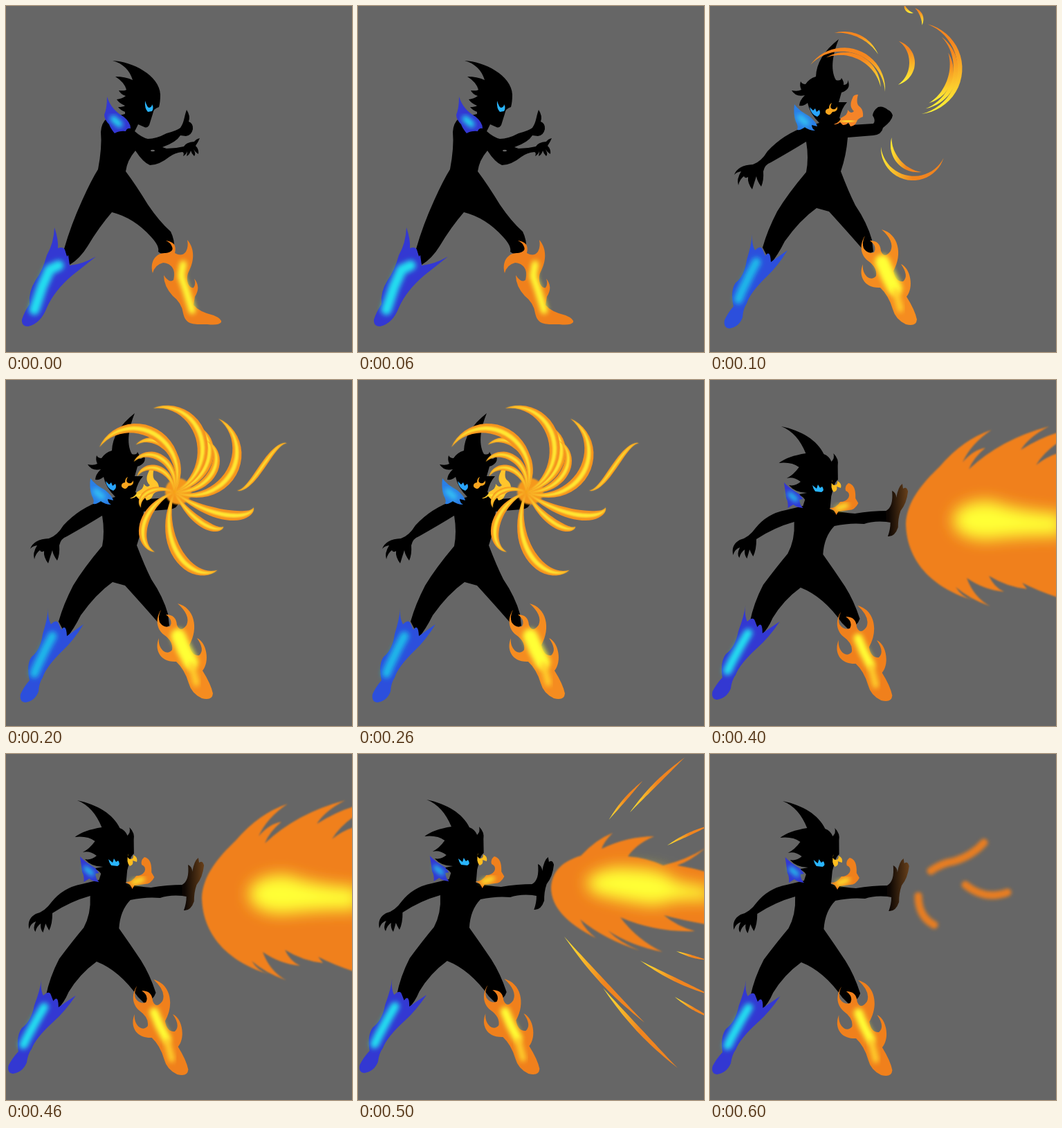
Recreate the animation shown at these times as an HTML page. Size 500 px wide and 500 px high, loop 700 ms.

```html
<!DOCTYPE html>
<html lang="en">
<head>
<meta charset="utf-8">
<title>Fire blast</title>
<style>
html, body { margin: 0; width: 100%; height: 100%; overflow: hidden; background: #666; }
svg { display: block; width: 100vw; height: 100vh; }
.step { visibility: hidden; animation: show 700ms step-end infinite; animation-delay: calc(var(--n) * 100ms - 700ms); }
@keyframes show { 0% { visibility: visible; } 14.2857%, 100% { visibility: hidden; } }
.pale { --cold: #2c4fdc; --ice: #1cb9ea; --warm: #f58c20; --wide: 21; }
.blue { fill: var(--cold, #3338d2); }
.fire { fill: var(--warm, #f0801c); }
.hand { fill: var(--hand, #000); }
.glow { fill: none; stroke-linecap: round; stroke-linejoin: round; filter: url(#soft); }
.cyan { stroke: var(--ice, #20dff0); }
.yellow { stroke: #ffff35; }
.leg { stroke-width: var(--wide, 13); }
.core { fill: #ffff35; filter: url(#wide); }
.ring { fill: none; stroke: #e3821f; stroke-width: 3; stroke-linecap: round; }
.puff { fill: none; stroke: #e57d20; stroke-width: 11; stroke-linecap: round; filter: url(#haze); }
.lit { fill: #ffe632; filter: url(#edge); }
</style>
</head>
<body>
<svg viewBox="0 0 500 500" preserveAspectRatio="none">
<defs>
  <filter id="soft" x="-100%" y="-100%" width="300%" height="300%"><feGaussianBlur stdDeviation="3.5"/></filter>
  <filter id="haze" x="-50%" y="-50%" width="200%" height="200%"><feGaussianBlur stdDeviation="2.6"/></filter>
  <filter id="wide" x="-50%" y="-50%" width="200%" height="200%"><feGaussianBlur stdDeviation="11"/></filter>
  <filter id="edge" x="-10%" y="-10%" width="120%" height="120%"><feGaussianBlur stdDeviation="1"/></filter>
  <linearGradient id="down" x2="0" y2="1"><stop offset=".2" stop-color="#f5861f"/><stop offset=".95" stop-color="#fff035"/></linearGradient>
  <linearGradient id="across"><stop offset="0" stop-color="#ffe833"/><stop offset=".5" stop-color="#f0841f"/></linearGradient>
  <linearGradient id="singed"><stop offset=".1" stop-color="#120a04"/><stop offset="1" stop-color="#a8611c"/></linearGradient>
  <linearGradient id="charred"><stop offset=".1" stop-color="#0c0603"/><stop offset="1" stop-color="#68401a"/></linearGradient>

  <g id="coldBoot">
    <path class="blue" d="M61 330Q60 344 65 353Q73 345 76 352L80 361Q87 351 88 370Q99 362 112 353Q98 376 82 391Q58 414 53 430Q48 437 47 450Q42 464 28 466Q19 465 21 454Q26 443 34 434Q29 411 37 400Q50 390 53 367Q60 345 61 330Z"/>
    <path class="glow cyan" stroke-width="13" d="M67 370L57 389L45 414L41 424"/>
  </g>
  <g id="hotBoot">
    <path class="fire" d="M224 332C215 346 218 360 228 368Q242 378 240 390C232 400 219 388 221 373C214 389 222 408 246 407Q258 418 264 438Q268 453 283 460Q298 464 299 453Q296 439 284 420C295 407 290 379 276 373Q288 390 279 398Q268 399 265 383C279 358 272 329 248 323Q267 340 261 354Q252 366 247 354Q246 339 231 339Q242 347 237 356Q228 359 222 350Q219 342 224 332Z"/>
    <path class="glow yellow leg" d="M249 370L257 389L267 408"/>
    <path class="glow" stroke="#ffd02c" stroke-width="9" d="M268 412L275 438"/>
  </g>

  <g id="guard">
    <path d="M154 79C182 80 222 100 223 128Q223 139 221 146Q213 148 212 156L207 172Q204 177 200 175L191 171L186 181Q196 190 205 192Q217 192 232 184Q247 180 252 176C258 167 257 161 261 150Q267 159 264 167Q271 170 270 178Q268 187 260 188L252 187Q246 197 226 204L232 206Q245 206 257 203Q260 197 272 196Q275 192 280 191Q278 196 274 202Q279 207 278 214Q274 212 271 207Q275 214 272 217Q268 213 267 209Q266 214 261 217Q262 213 262 210Q260 215 256 217Q258 212 255 211Q244 212 236 218Q221 230 208 230Q198 226 187 209Q175 223 173 239Q188 259 205 287Q222 312 238 326Q244 338 243 352Q229 363 220 355Q222 347 210 334Q185 306 153 298Q134 320 118 347Q107 365 92 374L84 351Q94 316 110 281Q123 252 133 236Q139 204 137 182Q138 169 145 163L172 156L172 153Q166 151 162 146Q169 146 172 144Q164 141 160 135Q168 134 173 130Q165 127 163 122Q172 123 174 121Q171 110 158 102Q172 102 183 107C179 93 169 83 154 79Z"/>
    <ellipse cx="212" cy="209" rx="3" ry="1.2" fill="#666"/>
    <path class="blue" d="M146 131Q152 150 170 160Q180 168 180 177Q175 176 173 181Q164 180 157 184Q151 177 149 171Q142 164 142 157Q146 148 146 131Z"/>
    <path class="glow cyan" stroke-width="9" d="M155 163L164 171"/>
    <path fill="#29b5ff" d="M201 137Q204 147 207 147Q211 146 211 142Q214 147 211 152L205 153Q200 148 201 137Z"/>
    <path class="blue" d="M70 320Q76 338 75 350Q82 347 85 352L88 362L90 360L92 375Q111 373 130 362Q114 375 96 389Q70 411 59 436Q50 459 32 463Q22 463 23 453Q27 441 34 431Q32 413 43 396Q53 382 59 360Q69 343 70 320Z"/>
    <path class="glow cyan" stroke-width="15" d="M76 375L63 381L52 406L41 439"/>
    <path class="fire" d="M231 339Q248 341 244 357Q254 363 260 355Q264 348 262 338C275 353 270 372 265 382C258 394 264 409 271 407Q275 402 272 394Q282 406 273 420L271 432Q279 442 300 447Q312 452 311 457Q307 462 291 460C272 460 260 462 256 444Q254 429 241 419Q228 405 228 389Q236 401 242 396C246 382 240 372 227 371Q215 374 212 386C207 368 218 356 231 357Q243 355 240 348Q238 342 231 339Z"/>
    <path class="glow yellow" stroke-width="10" d="M256 373L253 390L260 410L269 440"/>
  </g>

  <g id="windup" class="pale">
    <path d="M186 48C178 68 173 91 182 107Q189 109 190 104Q194 110 193 114Q200 114 199 107Q205 120 190 125L186 139L198 139Q190 148 187 162L204 172L236 170Q240 166 235 158Q236 151 243 146Q250 144 257 150Q262 152 264 158Q263 166 250 176Q248 186 236 187L199 190Q197 216 189 239Q200 268 210 288Q227 313 234 338L236 355Q225 362 221 352Q202 330 172 297L154 292Q130 309 108 340Q98 360 88 372L76 349Q83 324 97 297Q112 272 139 240Q143 220 139 196Q118 209 88 226Q79 229 77 239Q78 252 74 261Q68 253 67 246Q64 255 61 265Q54 256 55 247Q51 250 49 246Q43 250 41 259Q38 250 45 239Q38 240 35 244Q40 230 62 229Q74 225 83 210Q106 185 139 174L158 169Q144 155 141 140Q136 145 129 144Q129 137 137 129Q124 132 118 122Q127 124 132 121Q129 115 131 109Q133 113 138 113Q143 105 153 102Q154 73 186 48Z"/>
    <path fill="#2a7fe6" d="M122 142Q128 151 143 159Q154 168 155 174L147 172Q147 177 152 180Q143 180 137 175Q131 180 126 179Q128 174 124 167Q120 155 122 142Z"/>
    <path class="glow" stroke="#36c4f4" stroke-width="9" d="M130 161L139 169"/>
    <path style="fill:var(--collar,#f58428)" d="M179 171Q188 168 189 162Q200 157 199 150Q204 157 208 152Q200 145 206 133Q207 128 214 128Q210 142 217 146Q222 151 221 160Q213 163 212 167Q210 173 203 174L200 168Q198 172 192 172L188 168Q184 172 179 171Z"/>
    <path class="glow yellow" stroke-width="6" d="M193 167L205 166"/>
    <path fill="#29a5ff" d="M144 146L149 151L152 148L154 153L158 150Q161 156 155 160Q146 157 144 146Z"/>
    <path fill="#f9a51e" d="M176 140Q172 147 177 149Q182 150 184 145Q185 153 177 153Q172 161 167 154Q166 149 172 148Q172 142 176 140Z"/>
    <use href="#coldBoot"/>
    <use href="#hotBoot"/>
  </g>

  <g id="strike">
    <path d="M132 68C161 74 184 88 193 108Q201 111 204 119Q209 114 207 107Q215 115 213 125L213 145Q209 148 207 155L203 169L201 188Q219 193 237 194Q260 190 284 190L284 206Q263 204 250 209Q230 207 207 212Q192 227 190 253Q206 276 221 299Q234 320 242 346Q238 358 225 361L216 352Q190 314 157 301Q132 319 116 345Q109 361 100 369L83 351Q89 323 103 297Q122 272 139 252Q150 232 149 206Q120 214 94 231Q94 246 89 256Q86 251 84 246Q82 253 80 259Q76 254 77 246Q71 250 69 258Q65 253 70 243Q63 245 60 254Q57 239 70 232Q83 229 93 215Q110 194 137 189L162 183L165 174Q161 167 152 167L168 164Q151 164 142 153Q151 155 159 148Q149 140 139 143Q149 138 157 127Q146 119 128 121Q141 111 167 107C159 87 149 75 132 68Z"/>
    <path class="hand" d="M282 190Q293 184 291 161Q297 164 297 171Q300 155 306 151L307 158Q312 154 314 162Q312 179 303 190Q299 201 299 214Q294 228 284 227Q288 216 288 207L282 206Z"/>
    <path class="blue" d="M135 149Q142 157 157 166L162 173L157 174Q157 181 162 186Q152 185 148 181L140 186Q141 177 138 172Z"/>
    <path class="glow cyan" stroke-width="6" d="M143 166L152 174"/>
    <path class="fire" d="M200 186Q209 187 216 177Q224 177 228 171Q231 164 224 161Q222 155 228 150Q239 152 238 172L242 179Q237 189 228 189L213 191L210 196Q207 188 200 186Z"/>
    <path class="glow yellow" stroke-width="6" d="M211 187L225 182"/>
    <path fill="#29b5ff" d="M176 153L182 158L184 152L187 157L190 155Q194 160 189 163L180 162Q177 158 176 153Z"/>
    <path fill="#ffbd20" d="M205 145Q202 150 207 153Q213 153 212 147Q219 150 217 157L211 155Q213 160 207 163Q201 158 205 145Z"/>
    <use href="#coldBoot" transform="matrix(1 0 -.074 1 40.4 -3)"/>
    <use href="#hotBoot" transform="matrix(1 0 -.02 1 -2.5 4)"/>
  </g>
</defs>

<rect width="500" height="500" fill="#666"/>

<g class="step" style="--n:0"><use href="#guard"/></g>

<g class="step" style="--n:1">
  <use href="#windup"/>
  <g id="wisps" fill="url(#down)"></g>
  <g id="lowWisps" fill="url(#across)"></g>
</g>

<g class="step" style="--n:2;--collar:#ffc52c">
  <use href="#windup"/>
  <ellipse cx="249" cy="161" rx="19" ry="19" fill="#f5981f" filter="url(#edge)"/>
  <g id="swirl" fill="#f5941f"></g>
</g>

<g class="step" style="--n:3;--hand:url(#singed)">
  <use href="#strike"/>
  <path class="ring" d="M314 145C312 80 318 45 324 44C332 45 328 100 327 130M305 135C303 95 310 68 318 70C328 75 326 110 326 130M289 230C290 270 298 286 304 286C313 284 314 270 316 262M301 218C300 260 310 276 318 272"/>
  <path class="fire" filter="url(#edge)" d="M327 118C338 87 367 70 396 70C430 73 436 114 447 145C457 180 480 198 502 199V205C472 207 456 225 441 246C422 286 395 307 360 307C332 304 318 288 316 262C323 227 323 172 327 118Z"/>
  <path class="core" d="M378 128Q415 112 424 142Q437 190 423 218Q402 270 373 268Q355 252 367 210Q355 160 378 128Z"/>
</g>

<g class="step" style="--n:4;--hand:url(#charred)">
  <use href="#strike" transform="matrix(1 0 .013 1 -30 -1)"/>
  <path class="fire" filter="url(#edge)" d="M283 207C285 175 306 150 332 125Q365 86 407 72Q377 92 365 119Q380 101 398 98Q381 112 374 129Q421 85 490 67Q461 82 449 101Q476 84 502 76V91Q482 105 471 123Q486 111 502 106V314Q472 304 451 293L458 302Q429 299 403 283Q411 300 425 306Q395 303 371 286Q381 314 405 327Q374 316 355 299Q364 314 380 318C328 303 284 267 283 207Z"/>
  <path class="core" d="M352 194Q368 173 407 175Q445 190 510 193V225Q445 225 400 231Q362 230 352 210Z"/>
</g>

<g class="step" style="--n:5">
  <use href="#strike" transform="matrix(1 0 .02 1 -34.2 -2)"/>
  <g id="sparks" fill="url(#across)"></g>
  <path class="fire" filter="url(#edge)" d="M279 193C281 165 300 154 322 147Q343 124 368 114Q355 127 352 137Q389 119 428 119Q402 130 390 148Q418 150 441 161Q474 153 502 136Q480 155 461 161Q480 164 502 170V246Q468 240 442 233Q461 249 487 256Q430 258 379 236Q404 269 440 286Q394 277 361 255Q379 273 407 284Q356 268 321 239Q329 255 344 266Q279 234 279 193Z"/>
  <path class="core" d="M330 182Q355 160 394 165Q442 165 460 185L510 194V212Q460 207 430 219Q390 215 345 203Q332 198 330 182Z"/>
</g>

<g class="step" style="--n:6;--hand:url(#charred)">
  <use href="#strike" transform="matrix(1 0 .0077 1 -27.5 0)"/>
  <path class="puff" d="M319 169Q334 158 353 155Q379 147 396 128M369 189Q397 212 430 200M301 205Q301 235 324 247"/>
</g>
</svg>
<script>
const polar = (x, y, r, deg) => [x + r * Math.cos(deg * Math.PI / 180), y + r * Math.sin(deg * Math.PI / 180)];

// Outline of a stroke along curve(t) that swells to half width w and ends in points.
function taper(curve, w, steps = 24) {
  const left = [], right = [];
  for (let i = 0; i <= steps; i++) {
    const t = i / steps, [x, y] = curve(t);
    const [ax, ay] = curve(t - .01), [bx, by] = curve(t + .01);
    const k = w * Math.sin(Math.PI * t) / Math.hypot(bx - ax, by - ay);
    left.push([x - (by - ay) * k, y + (bx - ax) * k]);
    right.unshift([x + (by - ay) * k, y - (bx - ax) * k]);
  }
  return 'M' + [...left, ...right].map(p => p.map(v => v.toFixed(1))).join('L') + 'Z';
}

function draw(id, curve, w, name = '') {
  const group = document.getElementById(id);
  const path = document.createElementNS(group.namespaceURI, 'path');
  path.setAttribute('d', taper(curve, w));
  path.setAttribute('class', name);
  group.append(path);
}

// Concentric arcs, each one smaller and shorter than the last.
function arcs(id, x, y, r, from, to, w, count = 1) {
  for (let i = 0; i < count; i++) {
    const a = from + 24 * i, b = to - 7 * i;
    draw(id, t => polar(x, y, r - 6 * i, a + (b - a) * t), w);
  }
}
arcs('wisps', 192, 124, 61, -140, 0, 3, 2);
arcs('wisps', 190, 98, 60, -100, -28, 2);
arcs('wisps', 257, 82, 35, -63, 65, 4);
arcs('wisps', 294, 90, 67, -72, 80, 3.5, 3);
arcs('wisps', 285, 22, 22, -60, 15, 2);
arcs('wisps', 294, -3, 13, 180, 90, 1.8);
arcs('lowWisps', 294, 202, 47, 178, 22, 3.2);
arcs('lowWisps', 306, 196, 44, 188, 90, 3);

function lit(curve, w) {
  draw('swirl', curve, w);
  draw('swirl', curve, w * .4, 'lit');
}

// Spiral arms around the fist; tip angle and length change evenly within a fan.
function fan(from, step, count, len, grow, curl) {
  for (let i = 0; i < count; i++) {
    const reach = len + grow * i, tip = from + step * i;
    lit(t => polar(243, 162, reach * Math.sin(t * Math.PI / 2), tip + curl * (1 - t)), 1.5 + reach * .05);
  }
}
fan(-157, 14, 3, 58, 15, 65);
fan(-75, 18, 2, 100, -12, 60);
fan(61, 47, 3, 129, -38, 50);
fan(11, 24, 2, 117, -30, 25);
fan(-149, 45, 3, 126, -1, 80);
lit(t => [334 + 72 * t, 160 - 69 * t * t * (3 - 2 * t)], 4);

// Sparks fly outward: angle and distance from the palm, then length.
const sparks = [
  [-43, 154, 74], [-39, 184, 112], [-19, 208, 70],
  [53, 80, 170], [53, 173, 158], [32, 186, 115], [22, 226, 48], [36, 257, 62]
];
for (const [deg, dist, len] of sparks) {
  const [x, y] = polar(250, 200, dist, deg);
  draw('sparks', t => polar(x, y, len * t, deg - 6 - 5 * (1 - t) * Math.sign(-deg)), 1 + len / 70);
}
</script>
</body>
</html>
```
